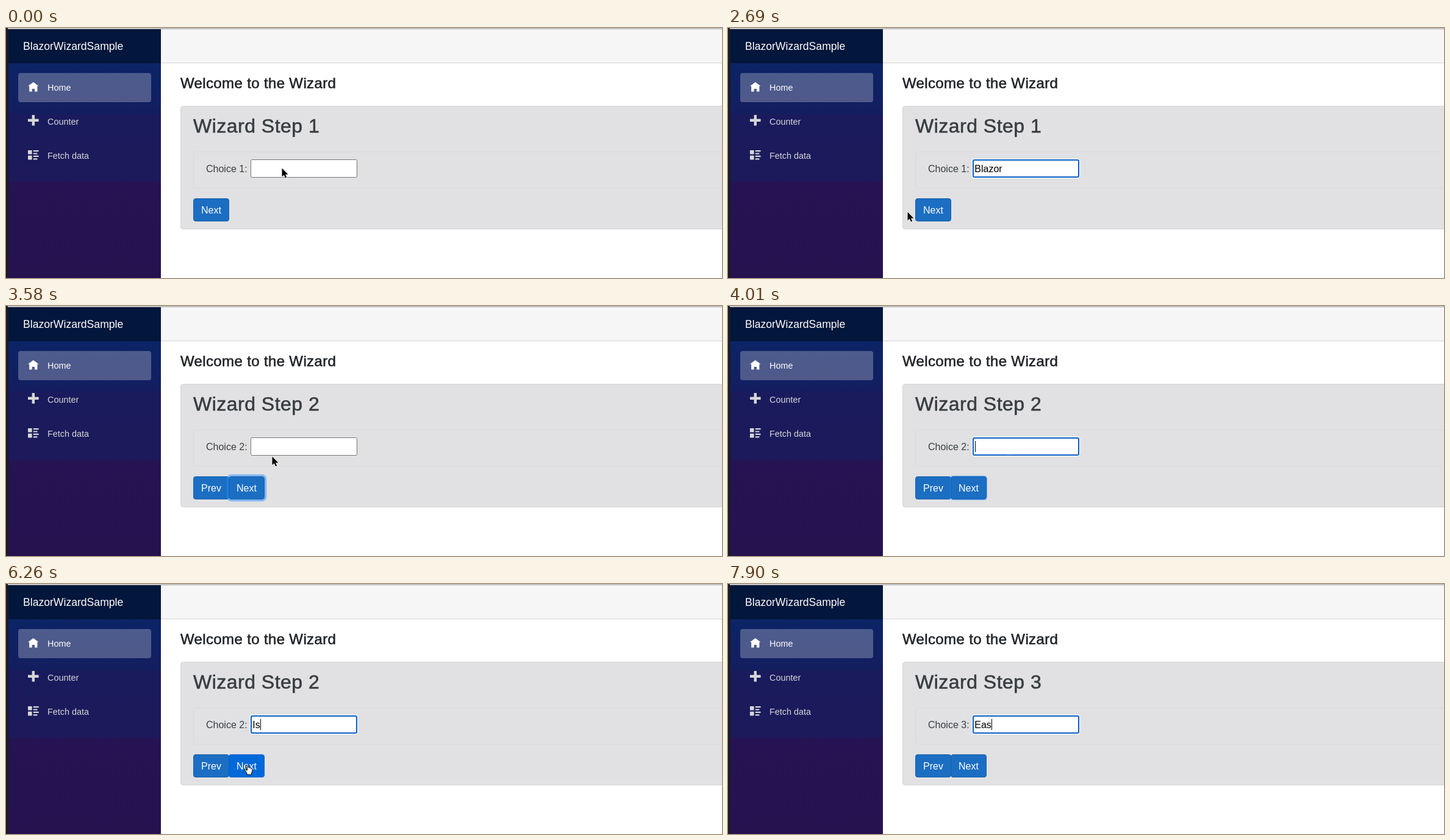
An HTML page for the animation above (8000 ms loop, 1174 px wide and 411 px high).

```html
<!DOCTYPE html>
<html lang="en">
<head>
<meta charset="utf-8">
<title>Wizard</title>
<style>
  html, body { margin: 0; width: 100%; height: 100%; overflow: hidden; background: #fff; }
  svg { display: block; font: 16px "Liberation Sans", Arial, sans-serif; }
  .nav { font-size: 14.4px; fill: #d7d7d7; }
  .heading { letter-spacing: .015em; stroke-width: .6px; }
  .button rect { fill: #1b6ec2; stroke: #1861ac; }
  .button.hover rect { fill: #0069d9; stroke: #0062cc; }
  .button text { fill: #fff; }
  .button .ring { fill: none !important; stroke: #268fff !important; stroke-opacity: .5; }
</style>
</head>
<body>
<svg width="1174" height="411" viewBox="0 0 1174 411">
  <defs>
    <linearGradient id="side" gradientUnits="userSpaceOnUse" x1="0" y1="58" x2="0" y2="411">
      <stop offset="0" stop-color="#0c2466"/>
      <stop offset=".23" stop-color="#131e60"/>
      <stop offset=".24" stop-color="#191b5d"/>
      <stop offset=".55" stop-color="#1c1a5b"/>
      <stop offset=".555" stop-color="#261353"/>
      <stop offset="1" stop-color="#26124f"/>
    </linearGradient>
  </defs>

  <rect x="254" width="920" height="57" fill="#f6f6f6"/>
  <rect x="254" y="57" width="920" height="1" fill="#d6d5d5"/>
  <rect width="4" height="411" fill="#1c1b20"/>
  <rect x="4" y="58" width="250" height="353" fill="url(#side)"/>
  <rect x="4" width="250" height="58" fill="#03163b"/>
  <rect x="3" width="1171" height="1" fill="#dcdcdc"/>
  <rect x="3" y="1" width="1171" height="1" fill="#a5a5a5"/>

  <text x="28" y="36" font-size="17.6" fill="#fff">BlazorWizardSample</text>
  <rect x="20" y="74" width="218" height="48" rx="4" fill="#fff" fill-opacity=".26"/>
  <g class="nav">
    <path transform="translate(36 89) scale(2.2)" fill="#fff" d="M4 0L0 3h1v4h2v-2h2v2h2v-4h1z"/>
    <text x="68" y="103" fill="#fff">Home</text>
    <path transform="translate(36 143) scale(2.2)" d="M3 0v3h-3v2h3v3h2v-3h3v-2h-3v-3z"/>
    <text x="68" y="159">Counter</text>
    <path transform="translate(36 201) scale(2.2)" d="M0 0h3v3h-3zM4 0h4v1h-4zM4 2h3v1h-3zM0 4h3v3h-3zM4 4h4v1h-4zM4 6h3v1h-3z"/>
    <text x="68" y="215">Fetch data</text>
  </g>

  <text class="heading" x="286" y="99" font-size="24" fill="#212529" stroke="#212529">Welcome to the Wizard</text>
  <rect x="286.5" y="128.5" width="920" height="202" rx="4" fill="#e1e1e3" stroke="#d3d4d7"/>
  <text id="title" class="heading" x="307" y="172" font-size="32" fill="#383d41" stroke="#383d41"></text>
  <rect x="307.5" y="203.5" width="900" height="60" rx="4" fill="none" stroke="#d9d9dc"/>
  <text id="label" x="328" y="237" fill="#383d41"></text>

  <rect id="idle" x="401.5" y="216.5" width="174" height="29" rx="2" fill="#fff" stroke="#767676"/>
  <g id="focused">
    <rect x="400" y="215" width="177" height="32" rx="3.5" fill="#fff"/>
    <rect x="402" y="217" width="173" height="28" rx="2" fill="#fff" stroke="#0b5fc4" stroke-width="2"/>
  </g>
  <text id="value" x="404.3" y="237"></text>
  <rect id="caret" y="222" width="1" height="18"/>

  <g id="prev" class="button" transform="translate(307 280)">
    <rect x=".5" y=".5" width="58" height="37" rx="3.5"/>
    <text x="13" y="25">Prev</text>
  </g>
  <g id="next" class="button">
    <rect id="ring" class="ring"/>
    <rect x=".5" y=".5" width="58" height="37" rx="3.5"/>
    <text x="13" y="25">Next</text>
  </g>

  <g id="cursor">
    <path id="arrow" stroke="#fff" stroke-width="1.2" paint-order="stroke" d="M.5 .5v14l3.2-3 2.3 5 2.2-1-2.2-4.8h4.5z"/>
    <path id="hand" fill="#fff" stroke="#000" stroke-linejoin="round"
      d="M-1.5 4v-6.5q0-1.5-1.3-1.5t-1 1.8l1.6 7-1.6-1.6q-1.5-1.2-2.2 0l4 5.8v2.500h7.500v-2.500q1.800-2.500 1.500-6.500-.5-1.700-2-1-.2-1.500-2-1-.5-1.500-2.200-.8l-.8-4"/>
    <g id="beam" fill="none">
      <path id="beamShape" stroke="#fff" stroke-width="2.5" d="M-3-7.500q3 0 3 2v11q0 2-3 2M3-7.500q-3 0-3 2M3 7.500q-3 0-3-2M-2 2.500h4"/>
      <use href="#beamShape"/>
    </g>
  </g>
</svg>
<script>
const $ = id => document.getElementById(id);
const LOOP = 8000;
const pointer = (cursor, x, y) => ({ cursor, x, y });
const type = value => ({ value, caret: 1 });
const caretOff = { caret: 0 }, caretOn = { caret: 1 };
const focusInput = { focus: 1, caret: 1 };
const pressNext = { focus: 0, caret: 0, ring: 3.2 };
const openStep = step => ({ step, value: "" });

// Each entry changes part of the state at its time in ms.
const events = [
  [0, { step: 1, value: "", focus: 0, caret: 0, ring: 0, ...pointer("arrow", 452, 230) }],
  [440, { ...focusInput, ...pointer("beam", 456, 236) }],
  [890, caretOff],
  ...[..."Blazor"].map((_, i) => [1190 + i * 150, type("Blazor".slice(0, i + 1))]),
  [2390, { ...caretOff, ...pointer("arrow", 428, 262) }],
  [2540, pointer("arrow", 345, 292)],
  [2690, pointer("arrow", 294, 302)],
  [2840, { ...caretOn, ...pointer("arrow", 299, 303) }],
  [2990, pointer("hand", 327, 304)],
  [3130, pointer("hand", 339, 303)],
  [3280, pressNext],
  [3430, { ...openStep(2), ...pointer("arrow", 392, 267) }],
  [3580, pointer("arrow", 436, 247)],
  [3730, pointer("beam", 457, 237)],
  [3870, pointer("beam", 461, 235)],
  [4010, { ...focusInput, ring: 1.2 }],
  [4160, { ring: 0 }],
  [4460, caretOff],
  [4760, type("I")],
  [4910, type("Is")],
  [5360, caretOff],
  [5810, pointer("arrow", 434, 257)],
  [5960, { ...caretOn, ...pointer("arrow", 414, 277) }],
  [6110, pointer("hand", 402, 296)],
  [6260, pointer("hand", 397, 302)],
  [6410, { ...caretOff, ...pointer("hand", 395, 303) }],
  [6560, pointer("hand", 394, 303)],
  [6710, pressNext],
  [6860, { ...openStep(3), ...pointer("arrow", 440, 249) }],
  [7010, pointer("beam", 443, 234)],
  [7160, { ...focusInput, ring: 1.2 }],
  [7300, { ring: 0 }],
  [7450, pointer("beam", 444, 231)],
  [7600, type("E")],
  [7900, type("Eas")]
];

const show = (id, on) => $(id).setAttribute("visibility", on ? "visible" : "hidden");
const move = (id, x, y) => $(id).setAttribute("transform", `translate(${x} ${y})`);

function drawRing(width) {
  const box = { x: -width / 2, y: -width / 2, width: 59 + width, height: 38 + width, rx: 4 + width / 2, "stroke-width": width };
  for (const key in box) $("ring").setAttribute(key, box[key]);
  show("ring", width);
}

function draw(time) {
  const s = Object.assign({}, ...events.filter(([at]) => at <= time).map(([, change]) => change));
  $("title").textContent = "Wizard Step " + s.step;
  $("label").textContent = `Choice ${s.step}:`;
  $("value").textContent = s.value;
  show("idle", !s.focus);
  show("focused", s.focus);
  show("caret", s.caret);
  $("caret").setAttribute("x", Math.round(404.5 + $("value").getComputedTextLength()));
  show("prev", s.step > 1);
  move("next", s.step > 1 ? 365 : 307, 280);
  $("next").classList.toggle("hover", s.cursor === "hand");
  drawRing(s.ring);
  for (const id of ["arrow", "hand", "beam"]) show(id, id === s.cursor);
  $("beam").setAttribute("stroke", "#000");
  const half = s.cursor === "beam" ? .5 : 0;
  move("cursor", s.x + half, s.y + half);
}

const start = performance.now();
function tick() {
  draw((performance.now() - start) % LOOP);
  requestAnimationFrame(tick);
}
tick();
</script>
</body>
</html>
```
